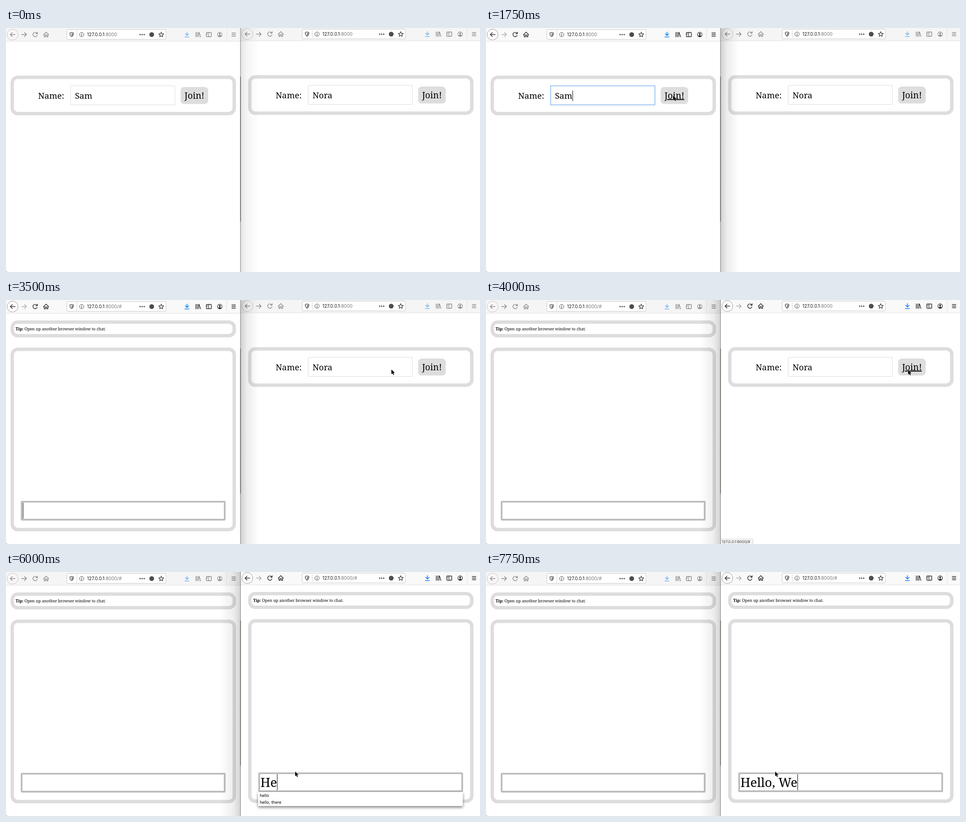
Animation, 1041 px wide and 538 px high, one loop 8 s. Source, as an HTML page:

```html
<!DOCTYPE html>
<html lang="en">
<head>
<meta charset="utf-8">
<title>Two-window chat</title>
<style>
  html, body { margin: 0; width: 100%; height: 100%; overflow: hidden; background: #fff; }
  svg { display: block; width: 1041px; height: 538px; }
  text { white-space: pre; }
  .serif { font-family: "Noto Serif", serif; }
  .sans { font-family: Inter, sans-serif; }
  .line { fill: none; stroke-width: 1.4; stroke-linecap: round; stroke-linejoin: round; }
  .menu { filter: drop-shadow(0 3px 3px rgba(0, 0, 0, .5)); }
</style>
</head>
<body>
<svg id="stage" viewBox="0 0 1041 538"></svg>
<script>
const LOOP = 8000, STEP = 250;
const stage = document.getElementById('stage');
const pen = document.createElement('canvas').getContext('2d');

const serifWidth = (s, size) => {
  pen.font = `${size}px "Noto Serif", serif`;
  return pen.measureText(s).width;
};
const at = (x, y, body) => `<g transform="translate(${x} ${y})">${body}</g>`;
const rect = (x, y, w, h, attrs) =>
  `<rect x="${x}" y="${y}" width="${w}" height="${h}" ${attrs}/>`;
const text = (x, y, size, s, attrs = '', font = 'serif') =>
  `<text class="${font}" x="${x}" y="${y}" font-size="${size}" ${attrs}>${s}</text>`;
const line = (d, color, attrs = '') =>
  `<path class="line" d="${d}" stroke="${color}" ${attrs}/>`;
const caret = (x, y, h) => rect(x, y, 1, h, 'fill="#000"');
const panel = (y, h) =>
  rect(13.75, y + 3.75, 487.5, h - 7.5, 'rx="12" fill="#fff" stroke="#ddd" stroke-width="7.5"');

// Toolbar: navigation, address bar and right-hand buttons have separate offsets.
function toolbar(w, active, path) {
  const ink = active ? '#2a2a2e' : '#8a8a8a';
  const blue = active ? '#0a7cf0' : '#78b6f4';
  const gray = '#4c4c50';
  const nav =
    `<circle cx="14.5" cy="14.5" r="12" fill="${active ? '#fff' : '#f8f8f8'}" stroke="${active ? '#999' : '#c4c4c4'}"/>` +
    line('M20 14.5H9.5m4.5-4.5-4.5 4.5 4.5 4.5', ink) +
    line('M34.5 14.5H45m-4.5-4.5 4.5 4.5-4.5 4.5', active ? '#aaa' : '#8a8a8a') +
    line('M68.4 16.3A4.8 4.8 0 1 1 67.6 11.2M69 9v3.5h-3.5', ink) +
    line('M82.3 14.7 88 9l5.7 5.7M84 14v5.5h2.6v-4h2.8v4H92V14', ink);
  const id =
    line('M144.3 9.6l4 1.2c0 4-.8 6.4-4 8.3-3.2-1.9-4-4.3-4-8.3z', gray) +
    `<path d="M144.3 11.7l2.2.6c0 2.2-.5 3.7-2.2 4.9z" fill="${gray}"/>` +
    line('M155.5 6v17', '#d4d4d4', 'style="stroke-width:1"') +
    `<circle cx="166.2" cy="14.5" r="4.8" fill="none" stroke="${gray}"/>` +
    line('M166.2 14v3m0-5.1v.1', gray) +
    text(178, 18.2, 10, `127.0.0.1<tspan fill="#777">${path}</tspan>`, 'fill="#18181a"', 'sans');
  const star = Array.from({ length: 10 }, (_, i) => {
    const r = i % 2 ? 2.6 : 5.8, a = i * Math.PI / 5;
    return `${(341 + r * Math.sin(a)).toFixed(1)} ${(14.8 - r * Math.cos(a)).toFixed(1)}`;
  }).join('L');
  const actions =
    [294.5, 299, 303.5].map(x => `<circle cx="${x}" cy="14.5" r="1.5" fill="${gray}"/>`).join('') +
    `<circle cx="320" cy="14.5" r="5.2" fill="${gray}"/>` +
    line(`M${star}Z`, gray);
  const tools =
    line('M397.5 9v7.5m-3.7-3.7 3.7 3.7 3.7-3.7M393 19.7h9', blue, 'style="stroke-width:1.6"') +
    line('M417 9.5v10m3-10v10m3-10v10m1.2-9.5 3 9.5', ink) +
    rect(440, 9.8, 11, 9.4, `rx="1.5" fill="none" stroke="${ink}" stroke-width="1.4"`) +
    line('M445 10v9M442 12.2h1m-1 2h1', ink, 'style="stroke-width:1.1"') +
    `<circle cx="469.5" cy="14.5" r="5.1" fill="none" stroke="${ink}" stroke-width="1.1"/>` +
    `<circle cx="469.5" cy="13" r="2" fill="${ink}"/><path d="M466 17.6q3.5-4 7 0-3.5 3-7 0" fill="${ink}"/>` +
    line('M484.5 1v27', '#e2e2e2', 'style="stroke-width:1"') +
    line('M496 11h8m-8 3.5h8m-8 3.5h8', ink);
  return rect(w.x, 0, w.width, 29.5 + w.dy, `fill="${active ? '#f9f9fa' : '#f5f5f5'}"`) +
    rect(w.x, 28.8 + w.dy, w.width, .8, 'fill="#ddd"') +
    at(0, w.dy,
      rect(w.bar, 3.5, w.barWidth, 21.5, 'rx="2.5" fill="#fff" stroke="#c8c8c8"') +
      at(w.nav, 0, nav) + at(w.id, 0, id) + at(w.actions, 0, actions) + at(w.tools, 0, tools));
}

function joinPage({ name, focus, hover }) {
  return panel(105, 87.5) +
    text(70.5, 155.8, 18.5, 'Name:') +
    rect(142, 127.5, 229, 42, `fill="#fff" stroke="${focus ? '#79aeea' : '#ddd'}" stroke-width="${focus ? 1.4 : 1}"`) +
    text(151.5, 155.8, 18.5, name) +
    (focus ? caret(152 + serifWidth(name, 18.5), 138, 23) : '') +
    rect(383.5, 130, 60.5, 37.5, 'rx="8" fill="#ddd"') +
    text(413.7, 155.8, 19.5, 'Join!', `text-anchor="middle" ${hover ? 'text-decoration="underline"' : ''}`);
}

function chatPage({ focus, typed = '' }) {
  const hints = typed ? ['hello', 'hello, there'].filter(s => s.startsWith(typed.toLowerCase())) : [];
  const menu = hints.length
    ? rect(32, 486, 449.5, 1 + 15 * hints.length, 'class="menu" fill="#fff"') +
      hints.map((s, i) => text(35.5, 497.3 + 15 * i, 9, s, '', 'sans')).join('')
    : '';
  return panel(45, 37.5) +
    text(21, 67.2, 8.85, '<tspan font-weight="700">Tip:</tspan> Open up another browser window to chat.') +
    panel(105, 405) +
    rect(34.3, 444.8, 446, 39.6, 'rx="1" fill="#fff" stroke="#b9b9b9" stroke-width="3.6"') +
    text(37, 475, 27.5, typed) +
    (focus ? caret(37 + serifWidth(typed, 27.5), 447, 35) : '') + menu;
}

const status = (x, opacity) => opacity
  ? `<g opacity="${opacity}">` + rect(x - 1, 527, 71.5, 12, 'rx="1" fill="#f5f5f5" stroke="#ccc" stroke-width=".8"') +
    text(x + 2, 536.2, 8.2, '127.0.0.1:8000/#', 'fill="#333"', 'sans') + '</g>'
  : '';

const left = { x: 0, width: 515, dy: 0, bar: 133.5, barWidth: 218, nav: 0, id: 0, actions: 0, tools: 0 };
const right = { x: 515, width: 526, dy: -1, bar: 650.5, barWidth: 227, nav: 515.5, id: 517, actions: 526, tools: 528 };

// Pointer travel: start time, end time, from, to.
const moves = [
  [250, 1000, [598, 97], [411, 149]],
  [2750, 3750, [411, 149], [927, 154]],
  [4500, 5250, [927, 154], [635, 440]]
];

function pointer(t) {
  const move = moves.filter(m => t >= m[0]).pop();
  if (!move) return '';
  const [start, end, from, to] = move;
  const p = Math.min(1, (t - start) / (end - start));
  const e = p * p * (3 - 2 * p);
  const [x, y] = from.map((v, i) => v + (to[i] - v) * e);
  return at(x, y, '<path d="M0 0v10.4l2.4-2.2 1.7 3.9 1.8-.8-1.7-3.7h3.3z" fill="#000" stroke="#fff" stroke-width=".8" paint-order="stroke"/>');
}

function typedAt(t) {
  if (t < 5750) return '';
  const count = t >= 7750 ? 9 : t >= 7500 ? 8 : t >= 7250 ? 6 : Math.min(5, (t - 5750) / STEP + 1);
  return 'Hello, We'.slice(0, count);
}

function fade(t, on, off, rest) {
  return t < on || t >= off + 2 * STEP ? 0 : t < off ? 1 : t < off + STEP ? .4 : rest;
}

function shade(from, to, opacity) {
  return `<linearGradient id="shade" gradientUnits="userSpaceOnUse" x1="${from}" x2="${to}">
    <stop stop-opacity="${opacity}"/><stop offset=".35" stop-opacity="${opacity * .4}"/>
    <stop offset="1" stop-opacity="0"/></linearGradient>` +
    rect(Math.min(from, to), 0, Math.abs(to - from), 538, 'fill="url(#shade)"');
}

function scene(t) {
  const rightOn = t >= 3750, leftOn = t >= 1750 && !rightOn;
  const leftChat = t >= 2250, rightChat = t >= 4500;
  return rect(0, 0, 1041, 538, 'fill="#fff"') +
    toolbar(left, leftOn, leftChat ? ':8000/#' : ':8000') +
    (leftChat ? chatPage({ focus: leftOn }) : joinPage({ name: 'Sam', focus: leftOn, hover: leftOn })) +
    status(0, fade(t, 2000, 2500, .07)) +
    toolbar(right, rightOn, rightChat ? ':8000/#' : ':8000') +
    at(521.7, -1, rightChat
      ? chatPage({ focus: true, typed: typedAt(t) })
      : joinPage({ name: 'Nora', hover: rightOn })) +
    status(516, fade(t, 4000, 4750, 0)) +
    (rightOn ? shade(515, 470, .17) : shade(515, 556, leftOn ? .18 : .1)) +
    rect(514.4, 0, 1.2, 538, 'fill="#8c8c8c"') +
    rect(514.4, 107, 1.2, 320, 'fill="#5d554a"') +
    '<path d="M0 534q0 4 4 4H0z" fill="#888"/>' +
    pointer(t);
}

const origin = performance.now();
let shown = -1;
function tick(now) {
  const t = Math.floor(Math.max(0, now - origin) % LOOP / STEP) * STEP;
  if (t !== shown) {
    shown = t;
    stage.innerHTML = scene(t);
  }
  requestAnimationFrame(tick);
}
tick(origin);
</script>
</body>
</html>
```
